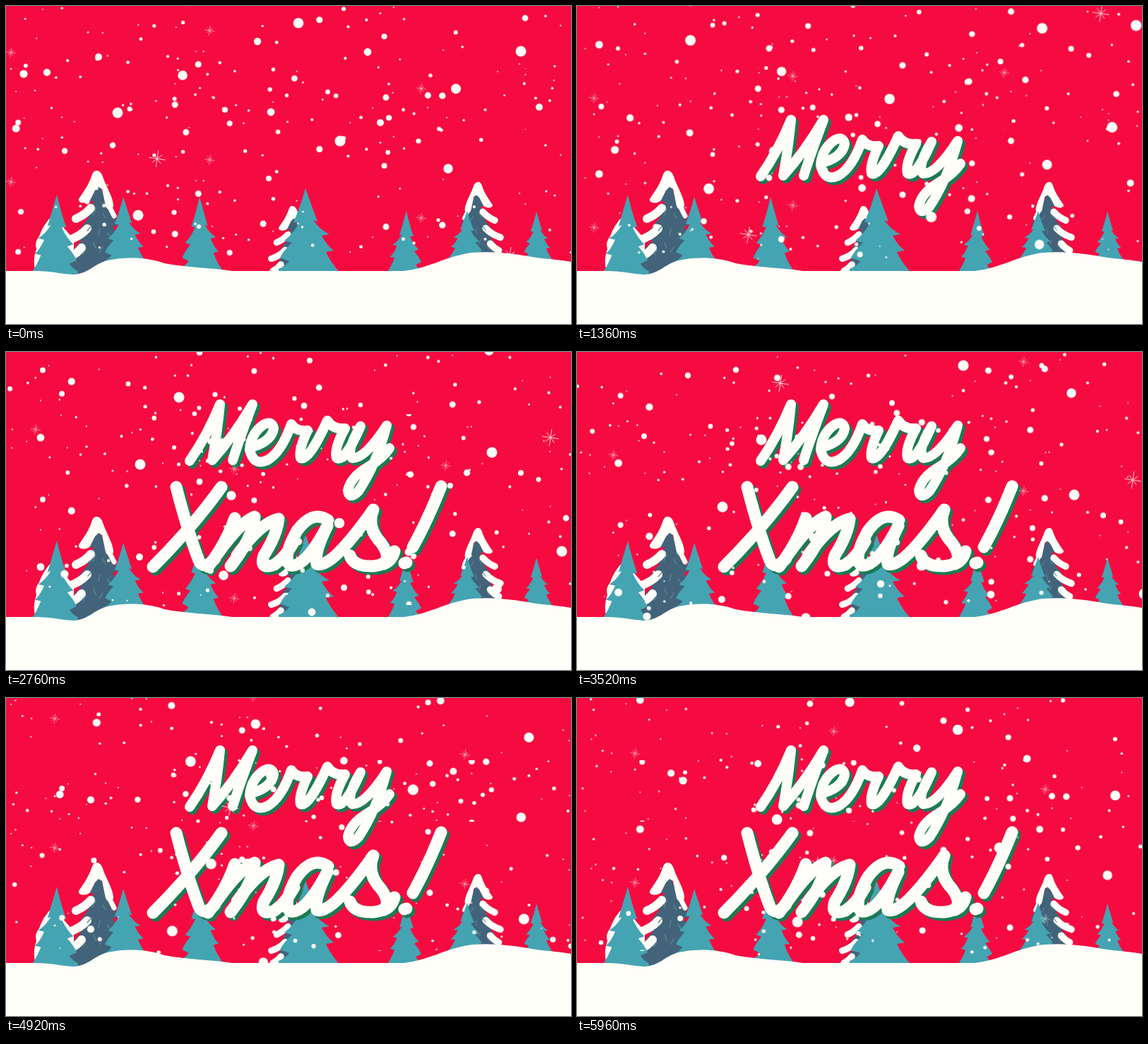
Recreate the animation shown at these times as an HTML page. Size 800 by 450 pixels, loop 6 s.

```html
<!DOCTYPE html>
<html lang="en">
<head>
<meta charset="utf-8">
<title>Merry Xmas!</title>
<style>
  html, body { margin: 0; width: 100%; height: 100%; overflow: hidden; background: #f60b40; }
  svg.layer { position: absolute; left: 0; top: 0; width: 800px; height: 450px; }
  .word path { fill: none; stroke-linecap: round; stroke-linejoin: round; }
  .shade { stroke: #1b7b53; transform: translate(4px, 4px); }
  .face { stroke: #fffef8; }
  .merry { stroke-width: 14; animation: wipe-merry 6s linear infinite, lift 6s infinite; }
  .xmas { stroke-width: 17; animation: wipe-xmas 6s linear infinite; }
  .fall { animation: fall 6s linear infinite; }

  @keyframes fall { to { transform: translate(126px, 474px); } }
  @keyframes wipe-merry {
    0%, 6.67% { clip-path: inset(0 550px 0 0); opacity: .8; }
    20% { opacity: 1; }
    22.8%, 100% { clip-path: inset(0 240px 0 0); opacity: 1; }
  }
  @keyframes lift {
    0%, 33% { transform: translateY(87px); animation-timing-function: ease-in-out; }
    42%, 100% { transform: none; }
  }
  @keyframes wipe-xmas {
    0%, 34% { clip-path: inset(0 605px 0 0); }
    44%, 100% { clip-path: inset(0 160px 0 0); }
  }
</style>
</head>
<body>
<svg class="layer" viewBox="0 0 800 450" aria-hidden="true">
  <defs>
    <path id="fir" fill="#45a4b2" d="M0 0L17 47L11 45Q21 59 34 65L23 67Q31 82 40 88L29 90Q36 105 46 116L46 122H-38V114Q-28 110 -23 103L-36 98Q-31 88 -19 77L-30 74Q-18 65 -9 49L-17 48Q-8 28 0 0Z"/>
    <g id="snowy" stroke-linecap="round" stroke-linejoin="round">
      <path fill="#42637a" d="M3 18L-13 44L-4 43L-18 62L-12 66L-34 96L-22 98L-42 122L-36 146H24L30 92L22 80L30 76L14 48Z"/>
      <path fill="none" stroke="#fffef8" stroke-width="12" d="M-30 68Q-18 63 -9 53M-40 98Q-24 93 -14 82M-37 121Q-28 117 -22 109"/>
      <path fill="none" stroke="#fffef8" stroke-width="7" d="M17 50L24 64"/>
      <path fill="#fffef8" d="M-1 0C6 0 8 8 10 14C16 28 23 40 23 50C21 58 14 56 12 50L7 26L2 23L-3 28L-10 42C-16 48 -28 46 -26 40C-18 28 -12 20 -8 8C-6 2 -4 0 -1 0Z"/>
      <path fill="none" stroke="#5a8a93" stroke-width="1.3" d="M-2 54L-6 63M8 60L12 67M-8 78L-14 85M4 82L2 91M14 88L19 94M-5 102L-2 110M8 108L3 116M-16 112L-20 119"/>
    </g>
  </defs>
  <path fill="#fffef8" d="M66 296Q52 310 47 326Q40 334 43 344Q37 360 42 376H96V330Z"/>
  <use href="#snowy" transform="translate(129 233)"/>
  <use href="#snowy" transform="translate(406 283) scale(.76)"/>
  <use href="#snowy" transform="translate(668 249) scale(-.8 .8)"/>
  <use href="#fir" transform="translate(72 267) scale(-.78 .95)"/>
  <use href="#fir" transform="translate(166 270) scale(.72 .8)"/>
  <use href="#fir" transform="translate(274 270) scale(.68 .88)"/>
  <use href="#fir" transform="translate(424 258)"/>
  <use href="#fir" transform="translate(567 290) scale(-.58 .74)"/>
  <use href="#fir" transform="translate(653 290) scale(-.58 .58)"/>
  <use href="#fir" transform="translate(751 291) scale(.48 .58)"/>
</svg>

<svg class="layer word merry" viewBox="0 0 800 450" role="img" aria-label="Merry">
  <defs>
    <path id="merry" d="M260 154Q284 120 303 74Q299 116 292 153Q322 120 349 74Q331 122 321 153
      M350 134Q376 126 379 108Q377 97 366 102Q347 114 345 138Q350 162 370 153Q390 142 404 102
      Q411 113 427 111Q414 138 417 150Q428 156 455 97Q463 110 480 108Q464 137 468 150Q480 156 502 105
      Q481 140 490 150Q508 152 539 104Q524 160 499 197Q486 210 484 196Q488 177 512 163Q533 151 543 136"/>
  </defs>
  <use href="#merry" class="shade"/>
  <use href="#merry" class="face"/>
</svg>

<svg class="layer word xmas" viewBox="0 0 800 450" role="img" aria-label="Xmas!">
  <defs>
    <path id="xmas" d="M241 191Q256 250 273 295Q280 310 296 292M305 191Q264 248 208 304
      M324 235Q311 272 286 304M298 288Q330 242 352 233Q350 262 318 303M327 288Q360 242 386 236
      Q384 258 365 288Q358 309 380 301Q396 290 408 268
      M456 238Q434 223 412 253Q391 290 402 302Q424 306 455 246Q436 284 440 300Q460 308 520 223
      Q510 248 531 270Q552 300 520 303Q492 304 487 288M535 300Q546 296 550 282
      M616 190Q598 236 576 276M564 299V299.1M567 298V298.1"/>
  </defs>
  <use href="#xmas" class="shade"/>
  <use href="#xmas" class="face"/>
</svg>

<svg class="layer" viewBox="0 0 800 450" aria-hidden="true">
  <g id="snow" fill="#fffef8"></g>
  <path fill="#fffef8" d="M0 375H45C72 376 82 380 97 380C118 378 124 365 144 360C172 354 202 356 224 364C254 370 288 370 320 375H563C600 371 622 354 660 349C700 346 730 353 758 357Q782 359 800 362V450H0Z"/>
</svg>

<script>
  const H = 450;

  // x, y, radius in one tile
  const big = [
    [414, 24, 7.3], [729, 64, 7.5], [637, 117, 7], [626, 230, 6.7], [473, 191, 7.6],
    [250, 98, 6.8], [158, 151, 7.4], [187, 296, 7.5], [132, 391, 7.5], [630, 374, 7.5],
    [261, 435, 6.6], [763, 370, 7.7], [-170, 10, 8.5], [-243, 142, 9], [-238, 433, 6.6]
  ];
  const medium = [
    [131, 72, 5], [512, 65, 5.4], [356, 50, 5.2], [375, 150, 5.4], [530, 165, 5],
    [25, 96, 5.6], [735, 17, 4.4], [755, 143, 5], [83, 205, 4.2], [21, 291, 4],
    [151, 197, 4.3], [364, 308, 4.5], [372, 244, 4], [584, 191, 3.6], [571, 421, 4],
    [671, 403, 4], [115, 277, 3.4], [273, 312, 3], [238, 292, 3.6], [180, 367, 3]
  ];
  const stars = [[214, 216], [713, 353], [-255, 268]];

  let seed = 29;
  const rand = () => (seed = seed * 16807 % 2147483647) / 2147483647;
  const small = Array.from({ length: 84 }, () =>
    [-400 + rand() * 1480, rand() * H, 1.5 + 2 * rand() ** 1.6]);

  const dot = ([x, y, r]) => `<circle cx="${x}" cy="${y}" r="${r}"/>`;

  function star([x, y]) {
    let d = '';
    for (let i = 0; i < 8; i++) {
      const a = i * Math.PI / 4 + 0.15, r = i % 2 ? 9 : 12;
      d += `M${x} ${y}l${r * Math.cos(a)} ${r * Math.sin(a)}`;
    }
    return `<path d="${d}" stroke="#fffef8" stroke-width="1" stroke-opacity=".85"/>`;
  }

  const field = [...big, ...medium, ...small].map(dot).join('') + stars.map(star).join('');
  const copies = [0, -H, -2 * H].map(y => `<g transform="translate(0 ${y})">${field}</g>`).join('');

  // A clipped window through which the repeated field falls
  const tile = (x, y, s) =>
    `<g transform="translate(${x} ${y}) scale(${s})">
      <svg x="-300" y="0" width="1400" height="${H}" viewBox="-300 0 1400 ${H}">
        <g class="fall">${copies}</g>
      </svg>
    </g>`;

  document.getElementById('snow').innerHTML =
    tile(0, 0, 1) + tile(160, -95, 0.6) + tile(160, 88, 0.6);
</script>
</body>
</html>
```
